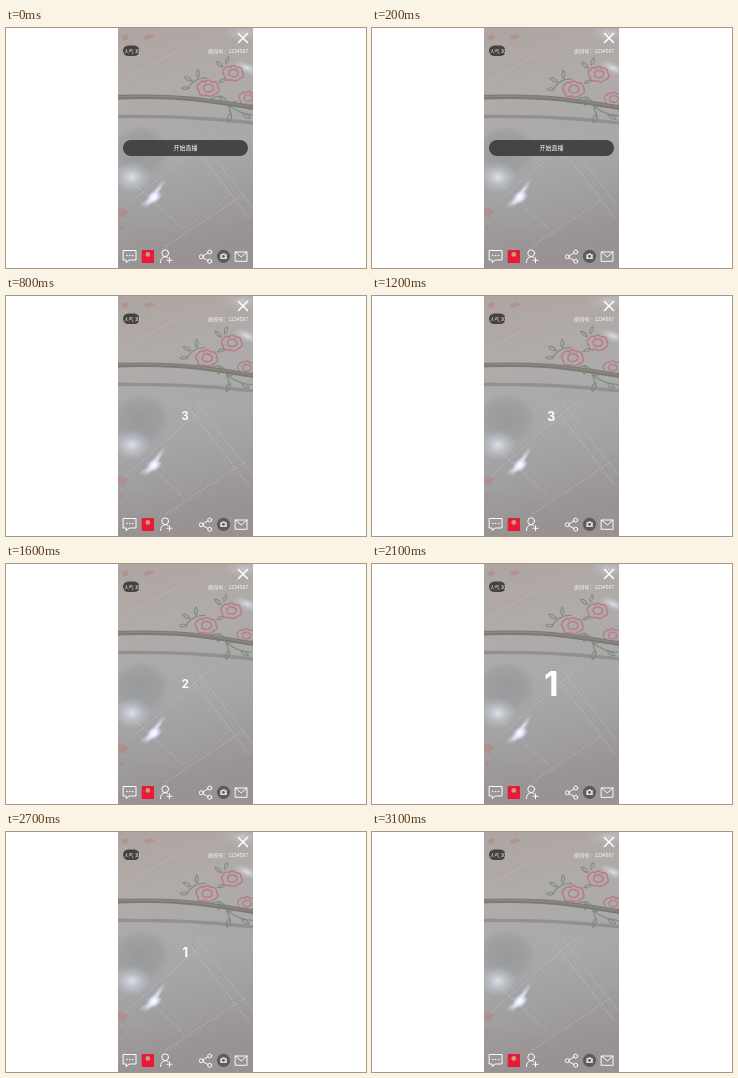
An HTML page for the animation above (3200 ms loop, 360 by 240 pixels).

```html
<!DOCTYPE html>
<html lang="zh">
<head>
<meta charset="utf-8">
<style>
html, body { margin: 0; width: 100%; height: 100%; overflow: hidden; background: #fff; }
svg { display: block; width: 360px; height: 240px; }
text { font-family: "Noto Sans CJK SC", "Noto Sans CJK", sans-serif; fill: #fff; }
#digit { font: 700 13px Inter, sans-serif; text-anchor: middle; }
.icon { fill: none; stroke: #fff; stroke-width: .95; stroke-linecap: round; stroke-linejoin: round; }
</style>
</head>
<body>
<svg viewBox="0 0 360 240">
  <defs>
    <linearGradient id="cloth" x1="0" y1="0" x2=".15" y2="1">
      <stop offset="0" stop-color="#aea5a1"/>
      <stop offset=".3" stop-color="#b0aba9"/>
      <stop offset=".58" stop-color="#a7a8aa"/>
      <stop offset="1" stop-color="#989292"/>
    </linearGradient>
    <radialGradient id="glow">
      <stop offset="0" stop-color="#e6ebf6" stop-opacity=".85"/>
      <stop offset=".5" stop-color="#d4dae4" stop-opacity=".4"/>
      <stop offset="1" stop-color="#c8ced6" stop-opacity="0"/>
    </radialGradient>
    <radialGradient id="shade">
      <stop offset="0" stop-color="#85888a" stop-opacity=".5"/>
      <stop offset=".7" stop-color="#85888a" stop-opacity=".3"/>
      <stop offset="1" stop-color="#85888a" stop-opacity="0"/>
    </radialGradient>
    <radialGradient id="spark">
      <stop offset="0" stop-color="#fff"/>
      <stop offset=".35" stop-color="#eff2ff" stop-opacity=".9"/>
      <stop offset="1" stop-color="#d2dafa" stop-opacity="0"/>
    </radialGradient>
    <pattern id="weave" width="4" height="4" patternUnits="userSpaceOnUse" patternTransform="rotate(40)">
      <circle cx="1" cy="1" r=".7" fill="#d6d8dc"/>
    </pattern>
    <clipPath id="screen"><rect x="112" width="135" height="240"/></clipPath>
    <g id="flower" fill="none" stroke="#b97c88" stroke-width="1.6">
      <path d="M-3-6Q0-10 4-6Q10-7 10-1Q13 4 7 6Q3 10-2 7Q-9 9-9 3Q-13-2-8-5Q-6-8-3-6Z"/>
      <path d="M-4-2Q0-6 5-2Q7 3 1 4Q-6 4-4-2Z"/>
    </g>
    <path id="leaf" d="M0 0Q2-5 8-5Q7 0 0 0Z" fill="none" stroke="#7e8c81" stroke-width="1.2"/>
  </defs>

  <g clip-path="url(#screen)">
    <rect x="112" width="135" height="240" fill="url(#cloth)"/>
    <path d="M112 98L247 104V150L180 205L112 195Z" fill="url(#weave)" opacity=".2"/>
    <ellipse cx="237" cy="5" rx="22" ry="9" fill="url(#glow)" opacity=".5"/>
    <ellipse cx="241" cy="40" rx="15" ry="6" fill="url(#glow)" transform="rotate(22 241 40)"/>
    <ellipse cx="134" cy="123" rx="30" ry="26" fill="url(#shade)"/>
    <ellipse cx="126" cy="149" rx="19" ry="16" fill="url(#glow)"/>
    <g fill="none" stroke="#d0d0d1" stroke-opacity=".25">
      <path d="M112 186L206 104M190 106L250 184M112 56L176 20"/>
      <path d="M183 112L243 190M160 218L240 165M122 150L176 200" stroke-width="2" stroke-dasharray="2 2"/>
    </g>
    <g id="flowers">
      <path d="M181 62Q188 51 200 52M204 73Q216 66 220 76L225 91M221 79Q232 88 247 89" fill="none" stroke="#7e8c81" stroke-width="1.2"/>
      <use href="#flower" x="201" y="62"/>
      <use href="#flower" transform="translate(226 47) scale(.95)"/>
      <use href="#flower" transform="translate(241 72) scale(.85)"/>
      <g id="leaves"></g>
    </g>
    <g fill="#b48481" opacity=".55">
      <path d="M115 8l6-2 2 4-5 3zM137 8l8-2 4 3-9 3z"/>
      <path d="M112 181q6-3 10 2l-4 7-6-2zM113 199q4-3 5 1l-4 4z"/>
    </g>
    <path d="M108 88.5Q160 88 196 90.5T252 95.5" fill="none" stroke="#858481" stroke-width="3.4" opacity=".65"/>
    <path d="M108 69.3Q158 67.5 190 71.3T252 80.5" fill="none" stroke="#7b7a73" stroke-width="4.6"/>
    <path d="M108 68.8Q158 67 190 70.8T252 80" fill="none" stroke="#8a8981" stroke-width="1.4"/>
    <ellipse cx="149" cy="166" rx="19" ry="3.5" fill="url(#spark)" opacity=".7" transform="rotate(-56 149 166)"/>
    <ellipse cx="145" cy="172" rx="14" ry="4" fill="url(#spark)" opacity=".6" transform="rotate(-30 145 172)"/>
    <ellipse cx="148" cy="169" rx="8" ry="6.5" fill="url(#spark)" transform="rotate(-35 148 169)"/>

    <rect x="117" y="17.5" width="16.5" height="10.5" rx="5.2" fill="#393837" opacity=".9"/>
    <text x="118" y="24.6" font-size="4.8">人气 10</text>
    <text x="202" y="24.6" font-size="5.1">房间号：1234567</text>
    <path class="icon" d="M232.5 5.5l9 9m0-9l-9 9" style="stroke-width:1.45"/>

    <g id="button">
      <rect x="-62.5" y="-8" width="125" height="16" rx="8" fill="#3c3b3a" opacity=".9"/>
      <text y="2.2" font-size="6" text-anchor="middle">开始直播</text>
    </g>
    <text id="digit" y="4.7"></text>

    <g class="icon">
      <path d="M117.5 222.5h12.5v9.5h-7l-2.7 2.8v-2.8h-2.8z"/>
      <path d="M120.8 227.4h.1m2.8 0h.1m2.8 0h.1" stroke-width="1.5"/>
      <path d="M163.5 229.8v5m-2.5-2.5h5M154.5 234.5q0-5.5 4.8-5.8q1.7 0 2.8.9"/>
      <circle cx="159.2" cy="225.2" r="3.4"/>
      <path d="M197.2 227.7l4.8-2.8m-4.8 5l4.8 2.6"/>
      <circle cx="195.3" cy="228.7" r="2"/>
      <circle cx="203.7" cy="224" r="2"/>
      <circle cx="203.7" cy="233.3" r="2"/>
      <path d="M229.5 224h11.5v9.3h-11.5zl5.75 5 5.75-5"/>
    </g>
    <rect x="135.7" y="222" width="12.3" height="13" rx=".8" fill="#ec1838"/>
    <path d="M136 223.6q5.8 4.4 11.7 0" fill="none" stroke="#a8343c"/>
    <circle cx="141.8" cy="226.4" r="2.4" fill="#c99e78"/>
    <circle cx="217.5" cy="228.3" r="6.6" fill="#5d5b5a"/>
    <path fill="#dededd" d="M214.3 226.2h1.7l.7-1h1.9l.7 1h1.5v4.7h-6.5z"/>
    <circle cx="217.5" cy="228.4" r="1.4" fill="#5d5b5a"/>
  </g>
</svg>
<script>
const LOOP = 3200, STEP = 100;
const $ = id => document.getElementById(id);
const counts = [["3", 565], ["2", 1280], ["1", 2050]], countEnd = 2850;
const pulse = [[0, 3], [125, 2], [250, .7], [375, 1]];
const drift = [[0, 1, -2], [400, 0, 0], [1600, -1, -.5], [3100, 0, -.5]];

// x, y, angle, scale
const leaves = [[182, 62, -150, .8], [185, 55, -120, .9], [191, 52, -60, .9], [216, 41, -110, .9],
  [219, 38, -40, .8], [212, 56, 10, .8], [214, 70, 130, .9], [222, 80, 0, .9], [224, 87, 140, 1], [236, 88, 60, .9]];
$("leaves").innerHTML = leaves.map(([x, y, a, s]) =>
  `<use href="#leaf" transform="translate(${x} ${y}) rotate(${a}) scale(${s})"/>`).join("");

function sample(keys, t, column = 1) {
  const next = keys.findIndex(key => key[0] > t);
  if (next < 0) return keys.at(-1)[column];
  if (next === 0) return keys[0][column];
  const a = keys[next - 1], b = keys[next];
  return a[column] + (b[column] - a[column]) * (t - a[0]) / (b[0] - a[0]);
}

function place(el, x, y, scale) {
  el.setAttribute("transform", `translate(${x} ${y}) scale(${scale})`);
}

function draw(t) {
  const p = Math.min(1, Math.max(0, (t - 225) / 370));
  const shrink = 1 - p * p * (3 - 2 * p);
  $("button").style.opacity = shrink;
  place($("button"), 179.5, 120, shrink);

  const count = t < countEnd && counts.findLast(([, start]) => t >= start);
  $("digit").textContent = count ? count[0] : "";
  if (count) place($("digit"), 179.2, 120, sample(pulse, t - count[1]));

  place($("flowers"), sample(drift, t), sample(drift, t, 2), 1);
}

const began = performance.now();
function tick() {
  const t = (performance.now() - began) % LOOP;
  draw(Math.floor(t / STEP) * STEP);
  requestAnimationFrame(tick);
}
tick();
</script>
</body>
</html>
```
